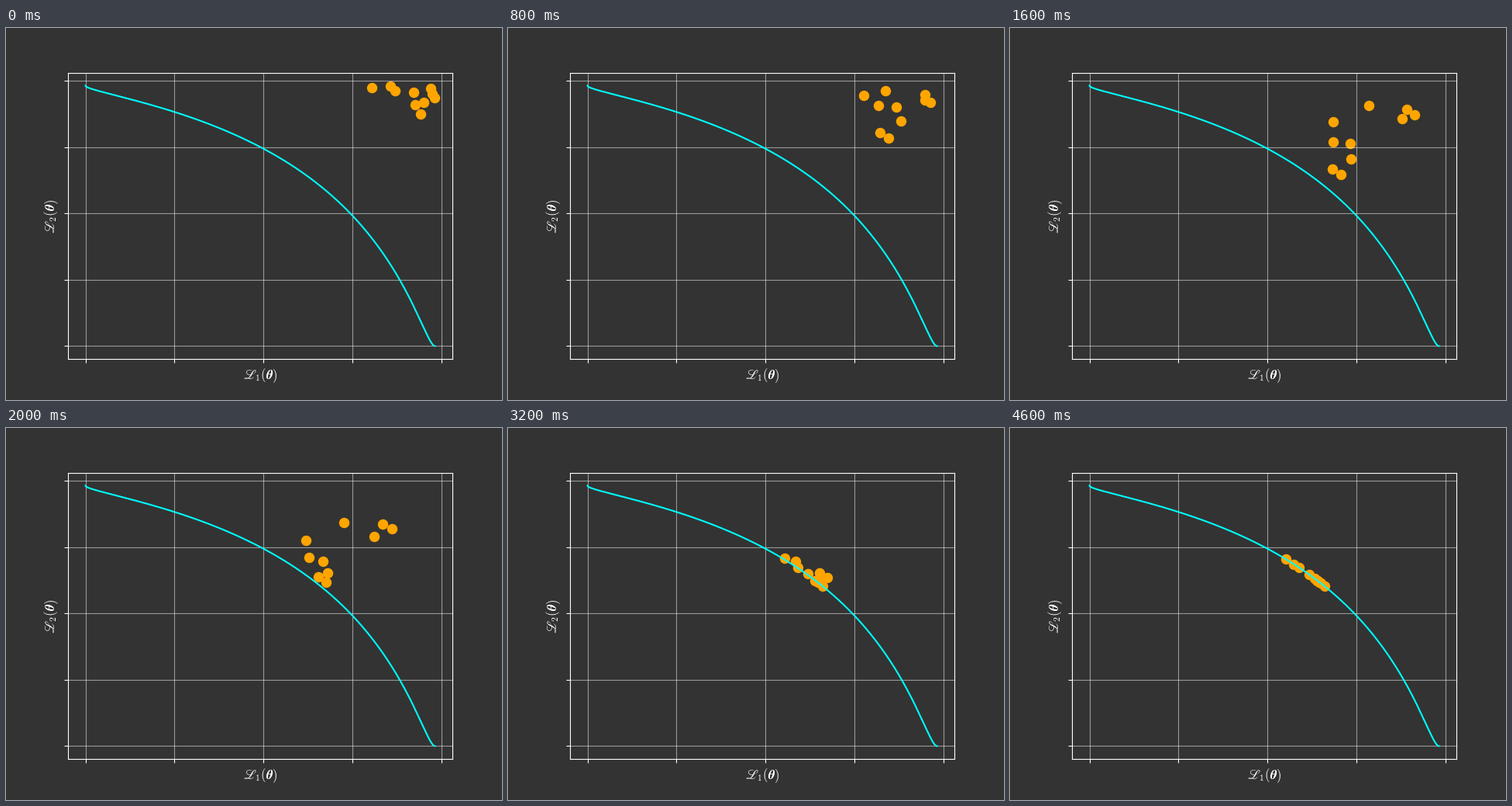
A matplotlib script that plays this animation: 640x480 px, repeating every 4700 ms.

```python
import numpy as np
import matplotlib.pyplot as plt
from matplotlib.animation import FuncAnimation

plt.rcParams["mathtext.fontset"] = "cm"

STEPS = 47
RATE = 0.2
ANCHOR = 16  # step at which the particle positions below hold

BG = "#333333"
TOP = 1 - np.exp(-4)
PAD = 0.05 * TOP

# Pixel positions of the particles at the anchor step
PIXELS = np.array([
    (417, 121), (417, 147), (416, 182), (427, 189), (440, 169),
    (439, 149), (463.1, 100.2), (511.8, 105.1), (506, 117), (522, 112),
])


def losses(t, r):
    """Two concave losses; t runs along the optimum axis, r is the distance from it."""
    return (1 - np.exp(-(t - 1) ** 2 - r ** 2),
            1 - np.exp(-(t + 1) ** 2 - r ** 2))


def from_pixels(px):
    """Invert the losses at given screen positions."""
    l1 = (px[:, 0] - 80) / 496 * (TOP + 2 * PAD) - PAD
    l2 = (427.2 - px[:, 1]) / 369.6 * (TOP + 2 * PAD) - PAD
    a, b = -np.log(1 - l1), -np.log(1 - l2)
    t = (b - a) / 4
    r = np.sqrt(np.maximum(a - (t - 1) ** 2, 0))
    return np.array([t, r])


def direction(state):
    """Minimum-norm convex combination of both gradients."""
    t, r = state
    l1, l2 = losses(t, r)
    g1 = 2 * (1 - l1) * np.array([t - 1, r])
    g2 = 2 * (1 - l2) * np.array([t + 1, r])
    gap = g2 - g1
    w = np.clip((g2 * gap).sum(0) / ((gap ** 2).sum(0) + 1e-12), 0, 1)
    return w * g1 + (1 - w) * g2


def step_back(state):
    prev = state
    for _ in range(60):
        prev = state + RATE * direction(prev)
    return prev


def trajectory():
    path = [from_pixels(PIXELS)]
    for _ in range(ANCHOR):
        path.insert(0, step_back(path[0]))
    while len(path) < STEPS:
        path.append(path[-1] - RATE * direction(path[-1]))
    return [np.column_stack(losses(*s)) for s in path]


path = trajectory()

fig = plt.figure(figsize=(6.4, 4.8), dpi=100, facecolor=BG)
ax = fig.add_axes([0.125, 0.11, 0.775, 0.77], facecolor=BG)
ax.set(xlim=(-PAD, TOP + PAD), ylim=(-PAD, TOP + PAD))
ticks = np.linspace(0, 1, 5)
ax.set_xticks(ticks, [])
ax.set_yticks(ticks, [])
ax.tick_params(color="white")
ax.grid(color="white", alpha=0.5)
for spine in ax.spines.values():
    spine.set_color("white")

ax.plot(*losses(np.linspace(-1, 1, 200), 0), color="cyan", lw=1.5)
dots = ax.scatter(*path[0].T, s=75, color="orange")

label = dict(color="white", size=12, ha="center", va="baseline",
             rotation_mode="anchor")
fig.text(328 / 640, 1 - 453 / 480,
         r"$\mathscr{L}_1(\boldsymbol{\theta})$", **label)
fig.text(63 / 640, 1 - 242.4 / 480,
         r"$\mathscr{L}_2(\boldsymbol{\theta})$", rotation=90, **label)


def update(i):
    dots.set_offsets(path[i])
    return (dots,)


anim = FuncAnimation(fig, update, frames=STEPS, interval=100,
                     repeat=True, repeat_delay=0)
plt.show()
```
